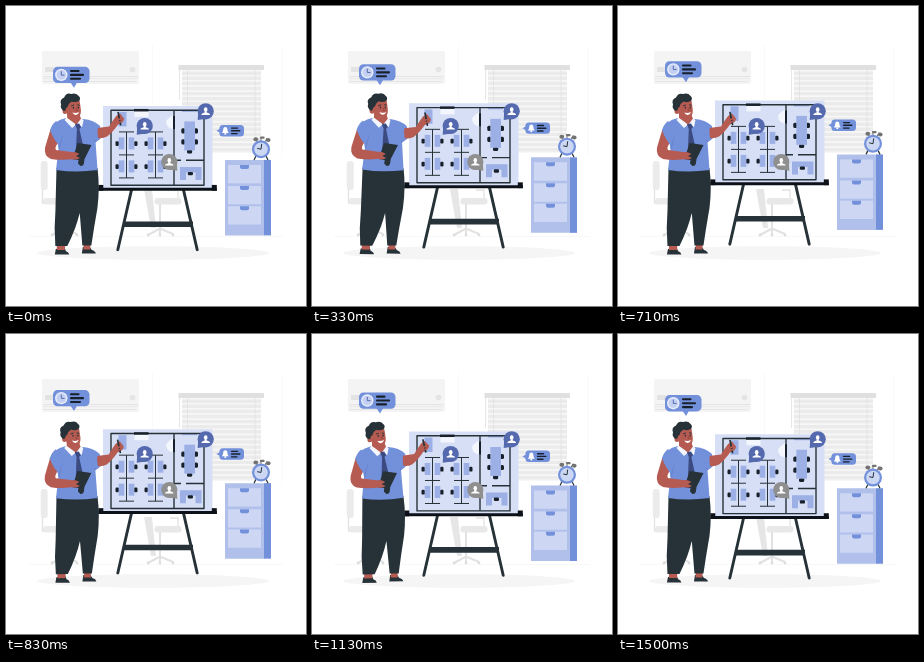
An HTML page with a canvas for the animation above (1.54 s loop, 300 px wide and 300 px high).

```html
<!DOCTYPE html>
<html lang="en">
<head>
<meta charset="utf-8">
<title>Office planning</title>
<style>
  html, body { margin: 0; width: 100%; height: 100%; overflow: hidden; background: #fff; }
  canvas { display: block; width: 300px; height: 300px; }
</style>
</head>
<body>
<canvas id="stage"></canvas>
<script>
const LOOP = 1540, LEAD = 50, LIFT = 6, SWAY = Math.PI / 180;
const DARK = '#263238', INK = '#18202b', BLUE = '#7390db', MID = '#9cb0e6',
      PALE = '#cdd7f3', SKIN = '#b55b52', NAVY = '#556aae', BLACK = '#0d1219';

const canvas = document.getElementById('stage');
const ctx = canvas.getContext('2d');
const ratio = window.devicePixelRatio || 1;
canvas.width = canvas.height = 300 * ratio;

function rect(x, y, w, h, color, r = 0) {
  ctx.fillStyle = color;
  ctx.beginPath();
  ctx.roundRect(x, y, w, h, r);
  ctx.fill();
}
function oval(x, y, rx, color, ry = rx) {
  ctx.fillStyle = color;
  ctx.beginPath();
  ctx.ellipse(x, y, rx, ry, 0, 0, 7);
  ctx.fill();
}
function shape(d, color) {
  ctx.fillStyle = color;
  ctx.fill(new Path2D(d));
}
function line(d, color, width = 1, cap = 'butt') {
  ctx.strokeStyle = color;
  ctx.lineWidth = width;
  ctx.lineCap = cap;
  ctx.lineJoin = 'round';
  ctx.stroke(new Path2D(d));
}
function group(draw, dx, dy, turn = 0) {
  ctx.save();
  ctx.translate(dx, dy);
  ctx.rotate(turn);
  draw();
  ctx.restore();
}

function airConditioner() {
  rect(36, 45, 97, 33, '#f4f4f4', 2);
  line('M37 70.5H132M37 75.5H130', '#e4e4e4', 0.9);
  line('M37 72.5H131', '#ebebeb', 1.6);
  rect(39, 61, 9, 5, '#e3e3e3', 1);
  oval(126.5, 63.5, 2.8, '#e4e4e4');
}

function blinds() {
  rect(176, 64, 79, 83, '#f7f7f7');
  for (let y = 65.5; y < 147; y += 5.1) rect(176, y, 79, 3.4, '#ebebeb');
  line('M181.5 64V147M249 64V147', '#e0e0e0', 0.7);
  line('M173.6 64V94', '#dedede', 0.8);
  rect(172.5, 59, 85.5, 5, '#e0e0e0', 0.5);
}

function chairBase(x) {
  line(`M${x} 198V225M${x - 12} 229L${x} 222.5L${x + 13} 228M${x} 223V229`, '#e2e2e2', 2);
  [x - 12, x, x + 13].forEach(cx => oval(cx, 229, 1.4, '#dddddd'));
}

function chairs() {
  rect(34.7, 155, 7, 29, '#ebebeb', 3);
  line('M36.5 183V197H42', '#e2e2e2', 1.3);
  rect(37, 192, 33, 6.5, '#ebebeb', 3);
  shape('M64 190H71L70 222H65Z', '#e6e6e6');
  chairBase(58);

  shape('M138 183H146L150 222H145Z', '#e6e6e6');
  rect(148.5, 192, 27, 6.5, '#e8e8e8', 3);
  line('M172 192V184H164', '#e2e2e2', 1.3);
  chairBase(154);
}

function background() {
  line('M22 230.5H278', '#f4f4f4', 0.6);
  line('M276 40V150M146.5 38V100', '#f8f8f8', 0.7);
  airConditioner();
  blinds();
  chairs();
  oval(147, 247, 116, '#f5f5f5', 6.8);
}

function cabinet() {
  rect(219, 154, 39.5, 75.5, '#b1c0eb');
  rect(258, 154, 7, 75.5, BLUE);
  [159, 180, 200.3].forEach(y => {
    rect(222, y, 33, 18.3, PALE);
    shape(`M234 ${y}h9v2q0 2-2 2h-5q-2 0-2-2z`, BLUE);
  });
}

function alarmClock() {
  line('M250 150L248 154M260 150L262 154', DARK, 1.2);
  line('M251 136L249.5 132M259 136L261 132M255 135V131', '#737373', 1);
  [[249.8, 133.3], [262.2, 134.2]].forEach(([x, y]) => oval(x, y, 2.4, '#737373', 2));
  rect(254, 130.6, 4.6, 2.2, '#737373', 1);
  oval(255, 143.3, 9, BLUE);
  oval(255, 143.3, 6.8, '#ccd7f4');
  line('M255 143.3L255.7 138M255 143.3L251.2 142.5', DARK, 1);
}

function workstations(x) {
  line(`M${x - 7.5} 126H${x + 7.5}M${x - 7.5} 149H${x + 7.5}M${x - 7.5} 172H${x + 7.5}M${x} 126V172`, DARK, 1);
  [131.5, 154.5].forEach(y => [-1, 1].forEach(side => {
    const cx = x + side * 5;
    rect(x + side * 9.3 - 1.7, y + 3.8, 3.4, 4.8, INK, 1.2);
    rect(cx - 2.8, y, 5.6, 12, MID);
  }));
}

function floorPlan() {
  rect(128.5, 105, 14, 6, '#f3f6fd');
  shape('M167 109V123Q160 122 160 115Q162 112 167 109Z', '#f3f6fd');
  rect(112.5, 106, 8, 14.5, MID);
  rect(176, 104, 15, 2, MID);
  workstations(120.5);
  workstations(149.5);
  [[177.3, 125], [177.3, 136], [190, 125], [190, 136]].forEach(([x, y]) => rect(x - 2, y - 2.6, 4, 5.2, INK, 1.5));
  rect(181, 143.5, 5.2, 4.2, INK, 1.5);
  rect(178.3, 115.5, 10.7, 29, MID);
  shape('M174 161H195.5V174H189.5V166.5H180V174H174Z', MID);
  rect(181.8, 166, 5.2, 3.4, INK, 1.2);
  line('M105 104.3H198V179.4H105Z', DARK, 1.4);
  line('M168 104V179M168 154.3H175M180 154.3H198', DARK, 1.4);
  line('M128 104.3H142.5', INK, 2.5);
  line('M168 110V123', INK, 2);
}

function board() {
  line('M125.5 184L111.8 243.8M177.5 184L191.2 243.8', DARK, 2.9, 'round');
  rect(118, 215.5, 69, 5.7, DARK);
  rect(97, 100, 109.5, 82.5, '#d6dff5');
  floorPlan();
  rect(92.3, 181.8, 118.5, 3, BLACK);
  rect(92.3, 179, 5, 5.8, BLACK);
  rect(205.8, 179, 5, 5.8, BLACK);
}

function clockBubble() {
  shape('M64 76L68 82L71.5 76Z', BLUE);
  rect(47, 61, 36.5, 16.3, BLUE, 4.5);
  oval(55.3, 69.1, 6.2, '#e9eefb');
  oval(55.3, 69.1, 4.8, '#c4d0f2');
  line('M55.3 65.5V69.3H58.5', NAVY, 1);
  line('M65 65.2H72.5M65 69.1H77M65 73H74', INK, 2.1, 'round');
}

function bellBubble() {
  shape('M215 122.5L210.4 125L215 127.5Z', BLUE);
  rect(213.4, 119.2, 24.6, 11.4, BLUE, 3.5);
  shape('M215.8 127.3Q217.2 126 217.2 124Q217.2 121.2 219.3 121.2Q221.4 121.2 221.4 124Q221.4 126 222.8 127.3Z', '#fff');
  oval(219.3, 128, 1, '#fff');
  line('M225.6 122.3H231.5M225.6 125H233.8M225.6 127.8H231', INK, 1.4, 'round');
}

function pin(x, y, color, side) {
  group(() => {
    shape(`M${side * 7.5} 0L${side * 8} 8.8L${-side} 7.5Z`, color);
    oval(0, 0, 8.1, color);
    oval(0, -1.8, 1.8, '#fff', 2.2);
    shape('M-4.3 3.6Q-4.3 1.9-1 1.2V0H1V1.2Q4.3 1.9 4.3 3.6Z', '#fff');
  }, x, y);
}

function legs() {
  shape('M50 243L49 248.6H63.5Q63 246 60 245L59 242Z', DARK);
  shape('M77 241L76 247.5H90Q89.5 245 86 244L84 241Z', DARK);
  shape('M51 238H59.5L59 244H51ZM78 237H84.5V243.5H77.5Z', SKIN);
  shape('M50.5 162H91.5Q94 182 91.5 202Q88 222 85.5 239.5H76.5L73.8 207Q70 223 61.5 240H49.5Q48 222 49.5 205Q50 183 50.5 162Z', DARK);
}

function torso() {
  shape('M84 124L92 119.5L94 133L86 139Z', BLUE);
  shape('M60 112Q67 116 77 113Q88 114 94 120L95 132L89.5 136L91.5 164Q70 167 50 164L52.5 143L51 134L44.5 124Q47 115 60 112Z', BLUE);
  line('M53 143L56.5 128M89.5 136L86.5 129', '#6079c2', 0.7);
  shape('M61 106L73 108L75.5 114Q74 119 70.5 120Q63 117 61 112Z', SKIN);
  shape('M60.5 111.5L70 118.5L66 122L58.5 114ZM75 112.5L70.5 118.5L76 121L77.5 114Z', '#f4f6fd');
  shape('M69 118L73 117.5L75 121L73.3 123L77.5 142L74 148L70 142L70.8 123Z', '#3b4a80');
}

function head() {
  oval(58.8, 105, 2.4, SKIN, 3);
  shape('M59 94Q67 88 73.5 95L74.8 104Q75 111.5 70 113Q62 113.5 60 106Z', SKIN);
  shape('M57.5 105Q53.5 102 55 98.5Q53 93.5 58 91.5Q60 86.5 65 88Q70 86.4 72.5 90Q75 92 73 95Q69 97 65.5 95.5Q62.5 97 61.5 101Q60 101 59.3 104.5Z', DARK);
  line('M65 99.8L68 99M71 98.8L73.5 99.3', DARK, 0.9);
  oval(67.3, 101.8, 0.7, DARK, 1);
  oval(72.2, 101.5, 0.7, DARK, 1);
  line('M70 102L71.5 104.8H69.7', '#8c3d3a', 0.7);
  shape('M66.3 106.5Q69.5 107.6 73 106Q72 109.2 69.5 109Q67.3 108.6 66.3 106.5Z', '#fff');
}

function arms() {
  shape('M44.5 123L52.5 136Q48 142 50 144L69 146.5L71 152.5Q57 155 45 153Q37.5 150 39 141.5Z', SKIN);
  shape('M50 115Q46 118 44 124Q47 133 53 139.5L57.5 126Z', BLUE);
  shape('M71.5 137L85.5 139L78.5 153L77.8 158Q77 160.3 74.5 160L72 157.5L72.5 154L66.5 153.3Z', DARK);
  shape('M66 146Q70 145.5 73.5 148L70 150L74 152Q70 154.5 66 153Z', SKIN);
  shape('M91 122L103 120.5Q107 114 110 110L114 107.5L118 112.5Q118 116.5 112 118.5Q106 127 101 130.5Q96 133 92 132Z', SKIN);
  shape('M87 116.5Q91 118 92 120.5L90 133L86.5 136Z', BLUE);
  line('M112 106.5L114.5 118.5', DARK, 1.7, 'round');
  line('M111 114L116 112.5M112 116.5L116 115', SKIN, 1.5, 'round');
}

function man() {
  legs();
  torso();
  head();
  arms();
}

// Linear triangle wave from 0 to 1 and back.
const triangle = u => 1 - Math.abs(1 - 2 * (u - Math.floor(u)));

function render(now) {
  const u = ((now + LEAD) % LOOP) / LOOP;
  const lift = -LIFT * triangle(u);
  const turn = SWAY * (2 * triangle(u + 0.25) - 1);

  ctx.setTransform(ratio, 0, 0, ratio, 0, 0);
  ctx.fillStyle = '#fff';
  ctx.fillRect(0, 0, 300, 300);
  background();
  group(() => {
    cabinet();
    alarmClock();
    board();
  }, 0, lift + 0.3);
  group(() => group(man, -79, -168), 79, 168, turn);
  group(() => {
    clockBubble();
    bellBubble();
  }, 0, lift + 0.2);
  pin(138.7, 120, NAVY, -1);
  pin(199.7, 105.3, NAVY, -1);
  pin(163.3, 156, '#8f8f8f', 1);
}

let start;
function tick(now) {
  start ??= now;
  render(now - start);
  requestAnimationFrame(tick);
}
render(0);
requestAnimationFrame(tick);
</script>
</body>
</html>
```
